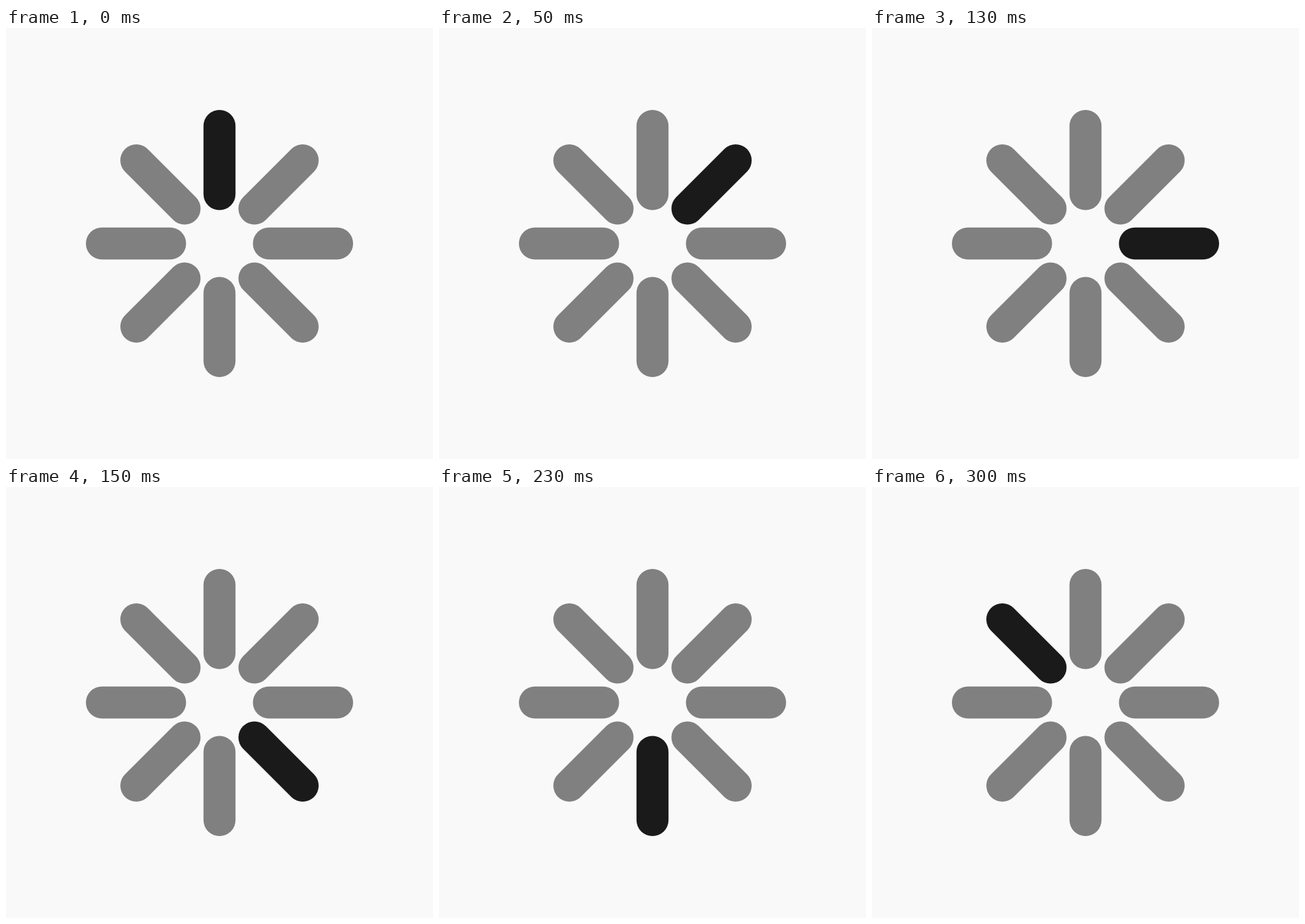
Recreate the animation shown at these times as an HTML page with a canvas. Size 620 px wide and 626 px high, loop 350 ms.

```html
<!DOCTYPE html>
<html lang="en">
<head>
<meta charset="utf-8">
<title>Spinner</title>
<style>
  html, body { margin: 0; width: 100%; height: 100%; overflow: hidden; background: #f9f9f9; }
  canvas { display: block; }
</style>
</head>
<body>
<canvas id="stage" width="620" height="626"></canvas>
<script>
const ctx = document.getElementById('stage').getContext('2d');
const CX = 310, CY = 313;
const SPOKES = 8, WIDTH = 46.5, INNER = 71.75, OUTER = 170.75;
const STEP = 50;
const ORDER = [0, 1, 2, 3, 4, 6, 7]; // the lower-left spoke never lights up

function spoke(i, color) {
  const a = i * 2 * Math.PI / SPOKES;
  const dx = Math.sin(a), dy = -Math.cos(a);
  ctx.strokeStyle = color;
  ctx.beginPath();
  ctx.moveTo(CX + dx * INNER, CY + dy * INNER);
  ctx.lineTo(CX + dx * OUTER, CY + dy * OUTER);
  ctx.stroke();
}

function draw(ms) {
  const lit = ORDER[Math.floor(ms / STEP) % ORDER.length];
  ctx.fillStyle = '#f9f9f9';
  ctx.fillRect(0, 0, 620, 626);
  ctx.lineWidth = WIDTH;
  ctx.lineCap = 'round';
  for (let i = 0; i < SPOKES; i++) spoke(i, i === lit ? '#1a1a1a' : '#808080');
}

const start = performance.now();
function tick() {
  draw(Math.max(0, performance.now() - start));
  requestAnimationFrame(tick);
}
tick();
</script>
</body>
</html>
```
